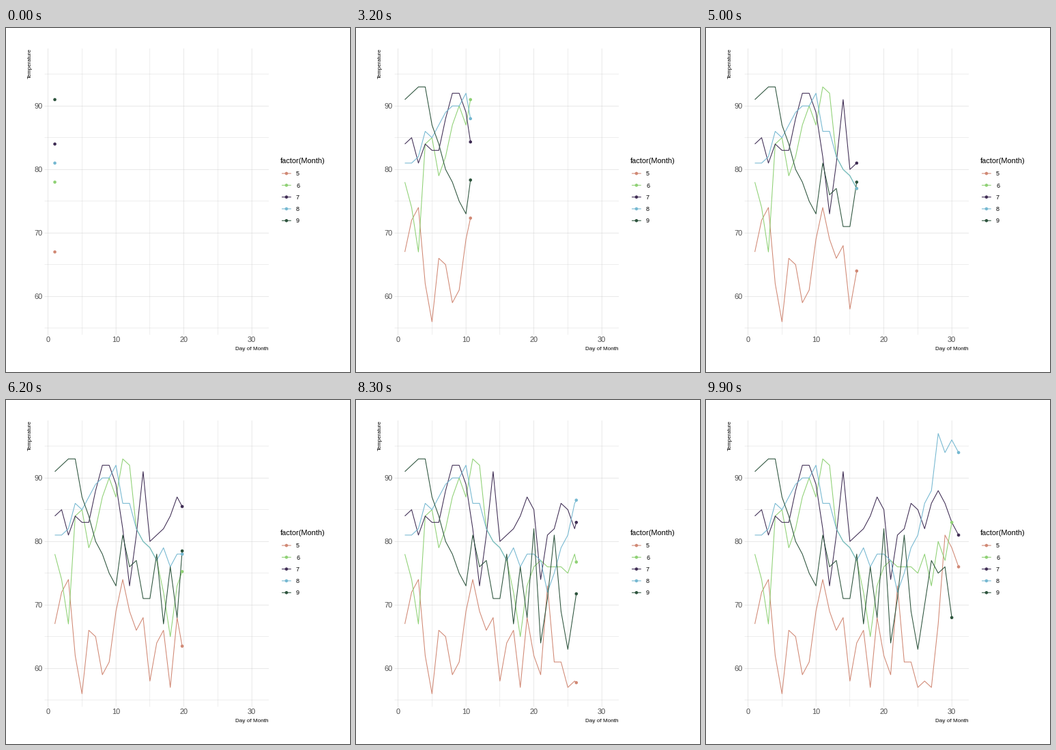
A matplotlib script that plays this animation: 504x504 px, repeating every 10 s.

```python
import numpy as np
import matplotlib.pyplot as plt
from matplotlib.animation import FuncAnimation
from matplotlib.patches import Circle

SIZE, DPI = 504, 72
FRAMES, INTERVAL = 100, 100

plt.rcParams["font.family"] = "Liberation Sans"
plt.rcParams["path.simplify"] = False

# Daily temperatures per month
may = [67, 72, 74, 62, 56, 66, 65, 59, 61, 69, 74, 69, 66, 68, 58, 64,
       66, 57, 68, 62, 59, 73, 61, 61, 57, 58, 57, 67, 81, 79, 76]
june = [78, 74, 67, 84, 85, 79, 82, 87, 90, 87, 93, 92, 82, 80, 79, 77,
        72, 65, 73, 76, 77, 76, 76, 76, 75, 78, 73, 80, 77, 83]
july = [84, 85, 81, 84, 83, 83, 88, 92, 92, 89, 82, 73, 81, 91, 80, 81,
        82, 84, 87, 85, 74, 81, 82, 86, 85, 82, 86, 88, 86, 83, 81]
august = [81, 81, 82, 86, 85, 87, 89, 90, 90, 92, 86, 86, 82, 80, 79, 77,
          79, 76, 78, 78, 77, 72, 75, 79, 81, 86, 88, 97, 94, 96, 94]
september = [91, 92, 93, 93, 87, 84, 80, 78, 75, 73, 81, 76, 77, 71, 71, 78,
             67, 76, 68, 82, 64, 71, 81, 69, 63, 70, 77, 75, 76, 68]

MONTHS = {
    "5": (may, "#d18975"),
    "6": (june, "#8fd175"),
    "7": (july, "#3f2d54"),
    "8": (august, "#75b8d1"),
    "9": (september, "#2d543d"),
}

DAYS = np.arange(1, 32)
# Each day lands on a whole frame; motion is linear in between
KEYS = np.rint((FRAMES - 1) * (DAYS - 1) / 30)


def px(day):
    return 61.6 + 9.95 * np.asarray(day)


def py(temp):
    return 393.2 - 9.3 * (np.asarray(temp) - 60)


fig = plt.figure(figsize=(SIZE / DPI, SIZE / DPI), dpi=DPI, facecolor="white")
ax = fig.add_axes([0, 0, 1, 1])
ax.set_xlim(0, SIZE)
ax.set_ylim(SIZE, 0)
ax.axis("off")


def stroke(x, y, color, width, z):
    line, = ax.plot(x, y, color=color, lw=width, zorder=z, snap=False,
                    solid_capstyle="butt", solid_joinstyle="round")
    return line


def dot(x, y, color):
    return ax.add_patch(Circle((x, y), 2.3, fc=color, lw=0, zorder=4))


def label(x, y, text, size, color="black", **kw):
    ax.text(x, y, text, fontsize=size, color=color, **kw)


def draw_grid():
    left, right = px([-0.5, 32.5])
    top, bottom = py([99.05, 53.95])
    for day in range(0, 31, 5):
        width = 0.32 if day % 10 else 0.43
        stroke([px(day)] * 2, [top, bottom], "#cccccc", width, 1)
    for temp in range(55, 96, 5):
        width = 0.32 if temp % 10 else 0.43
        stroke([left, right], [py(temp)] * 2, "#cccccc", width, 1)


def draw_labels():
    for day in range(0, 31, 10):
        label(px(day), 460, str(day), 11, "#4d4d4d", ha="center", va="baseline")
    for temp in range(60, 91, 10):
        label(54, py(temp) + 4, str(temp), 11, "#4d4d4d", ha="right", va="baseline")
    label(385, 472, "Day of Month", 8.1, ha="right", va="baseline")
    label(37, 30, "Temperature", 7.9, rotation=90, rotation_mode="anchor",
          ha="right", va="baseline")


def draw_legend():
    label(402, 198, "factor(Month)", 11, va="baseline")
    for i, (name, (_, color)) in enumerate(MONTHS.items()):
        y = 213.1 + 17.28 * i
        stroke([404, 417.8], [y, y], color, 1.07, 3)
        dot(410.9, y, color)
        label(425, y + 3.2, name, 9, va="baseline")


draw_grid()
draw_labels()
draw_legend()

series = [(np.array(temps), stroke([], [], color, 1.07, 3),
           dot(px(1), py(temps[0]), color))
          for temps, color in MONTHS.values()]


def update(frame):
    now = np.interp(frame, KEYS, DAYS)
    artists = []
    for temps, line, head in series:
        days = DAYS[:len(temps)]
        day = min(now, days[-1])
        temp = np.interp(day, days, temps)
        past = days < day
        line.set_data(px(np.append(days[past], day)),
                      py(np.append(temps[past], temp)))
        head.center = px(day), py(temp)
        artists += [line, head]
    return artists


anim = FuncAnimation(fig, update, frames=FRAMES, interval=INTERVAL,
                     repeat=True, repeat_delay=0)
plt.show()
```
